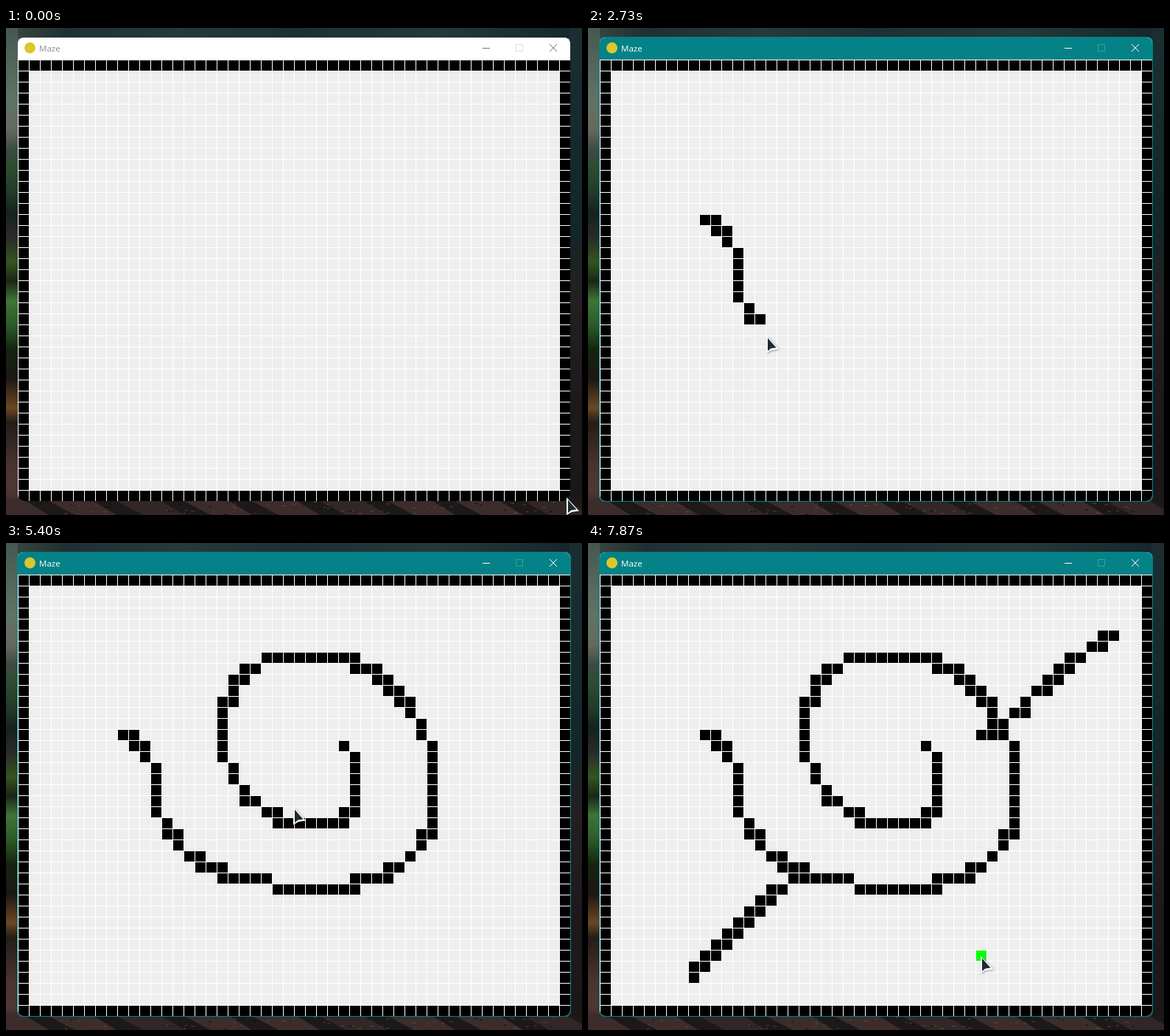
An HTML page with a canvas that plays this animation: 782 by 662 pixels, repeating every 8000 ms.

```html
<!DOCTYPE html>
<html lang="en">
<head>
<meta charset="utf-8">
<title>Maze</title>
<style>
  html, body { margin: 0; width: 100%; height: 100%; overflow: hidden; background: #18211f; }
  canvas { display: block; }
</style>
</head>
<body>
<canvas id="stage" width="782" height="662"></canvas>
<script>
const LOOP = 8000, FRAME = 200 / 3, PAINT_LAG = 30;
const COLS = 50, ROWS = 40, PITCH = 15, LEFT = 17, TOP = 44;
const FOCUS_TIME = 1000, GOAL_TIME = 7730, GOAL = [34, 34];
const ctx = document.getElementById('stage').getContext('2d');

// Piecewise linear lookup in a list of [x, y] knots.
function interpolate(knots, x) {
  let i = 1;
  while (i < knots.length - 1 && knots[i][0] < x) i++;
  const [x0, y0] = knots[i - 1], [x1, y1] = knots[i];
  return y0 + (y1 - y0) * (x - x0) / (x1 - x0);
}

// Walks the grid by compass moves such as "SE S4" and lists every cell passed.
function walk(col, row, moves) {
  const cells = [[col, row]];
  for (const [, heading, count] of moves.matchAll(/([NSEW]+)(\d*)/g)) {
    for (let n = +count || 1; n > 0; n--) {
      col += heading.includes('E') - heading.includes('W');
      row += heading.includes('S') - heading.includes('N');
      cells.push([col, row]);
    }
  }
  return cells;
}

// The mouse track holds plain waypoints and, while drawing, one point per cell.
const track = [];
const move = (t, x, y) => track.push({ t, x, y });
function draw(cells, knots) {
  cells.forEach(([col, row], i) => track.push({
    t: interpolate(knots, i), x: LEFT + 7 + col * PITCH, y: TOP + 7 + row * PITCH, cell: [col, row]
  }));
}

const spiral = walk(9, 14,
  'E S E S SE S4 SE S E S SE E S E2 S E4 SE E7 N E3 N E NE2 N E N8 ' +
  'NW N NW N W N W N W N W2 N W8 SW W S W S2 W S5 ' +
  'SE S SE S E SE E S E6 N E N5 NW');
const lowerLine = walk(17, 27, 'SW W ' + 'S W '.repeat(7) + 'S');
const upperLine = walk(34, 14, 'E N E NE E N NE E N E N E N E NE E N E');

const APPROACH = 800;
for (let i = 0; i <= 12; i++) {
  const u = i / 12, ease = u * u * (3 - 2 * u);
  move(40 + u * (APPROACH - 40), 762 - 587 * ease, 640 - 419 * ease);
}
move(870, 174, 224);
move(1200, 171, 297);
move(1500, 171, 297);
move(1733, 161, 265);
move(1870, 161, 265);
draw(spiral, [[0, 1900], [0.6, 2067], [13.4, 2733], [40.7, 3330], [52.5, 3600], [92, 4467], [104, 4733]]);
move(4830, 561, 240);
move(5070, 245, 437);
move(5330, 534, 260);
move(5400, 391, 361);
draw(lowerLine, [[0, 5520], [lowerLine.length - 1, 5930]]);
move(6200, 294, 413);
draw(upperLine, [[0, 6330], [upperLine.length - 1, 6690]]);
move(6867, 689, 186);
move(7070, 634, 337);
move(7330, 560, 470);
move(7530, 522, 560);
move(7860, 534, 563);

function pointerAt(t) {
  return {
    x: interpolate(track.map(p => [p.t, p.x]), Math.min(Math.max(t, track[0].t), 7860)),
    y: interpolate(track.map(p => [p.t, p.y]), Math.min(Math.max(t, track[0].t), 7860))
  };
}

function rect(x, y, w, h, color) {
  ctx.fillStyle = color;
  ctx.fillRect(x, y, w, h);
}

function polygon(points, color) {
  ctx.beginPath();
  points.forEach(([x, y]) => ctx.lineTo(x, y));
  ctx.closePath();
  ctx.fillStyle = color;
  ctx.fill();
}

function roundRect(x, y, w, h, radius) {
  ctx.beginPath();
  ctx.roundRect(x, y, w, h, radius);
}

function gradient(x0, y0, x1, y1, stops) {
  const fill = ctx.createLinearGradient(x0, y0, x1, y1);
  stops.forEach(([at, color]) => fill.addColorStop(at, color));
  return fill;
}

function drawForest() {
  rect(0, 0, 782, 662, gradient(0, 0, 0, 662, [
    [0, '#465850'], [.15, '#5f7466'], [.21, '#66685d'], [.25, '#3b4b44'], [.29, '#2d4c2e'],
    [.34, '#213a29'], [.38, '#16211f'], [.43, '#2b2b29'], [.48, '#35541f'], [.52, '#1b2618'],
    [.56, '#3e7635'], [.61, '#2c5a28'], [.66, '#16240f'], [.72, '#1c1715'], [.78, '#6b4822'],
    [.81, '#241d18'], [.9, '#4a3430'], [.95, '#4e3834'], [1, '#2b2124']
  ]));
  rect(16, 0, 766, 14, gradient(0, 0, 782, 0, [
    [0, '#3b4a46'], [.1, '#1f3033'], [.3, '#263a3b'], [.5, '#1d3033'], [.75, '#243939'], [1, '#14262a']
  ]));
  rect(765, 0, 17, 662, gradient(0, 0, 0, 662, [
    [0, '#1b2f32'], [.4, '#13262a'], [.55, '#241f20'], [.75, '#1e1a1b'], [1, '#1a1718']
  ]));
  rect(16, 642, 766, 20, '#1e1919');
  for (let x = -40; x < 700; x += 92) {
    polygon([[x, 640], [x + 62, 640], [x + 98, 662], [x + 42, 662]], x % 3 ? '#3d2c2c' : '#332627');
  }
  let seed = 7;
  const random = () => (seed = seed * 16807 % 2147483647) / 2147483647;
  for (let i = 0; i < 70; i++) {
    rect(80 + random() * 690, 644 + random() * 17, 2 + random() * 3, 1, ['#6a4a34', '#0e0d0e', '#51403a'][i % 3]);
  }
}

function drawWindow(active) {
  const ink = active ? '#ffffff' : '#777777';
  ctx.save();
  if (active) {
    roundRect(15, 12, 752, 632, 8);
    ctx.fillStyle = '#058287';
    ctx.fill();
  }
  roundRect(16, 13, 750, 630, 8);
  ctx.clip();
  rect(16, 13, 750, 630, '#ffffff');
  if (active) rect(16, 13, 750, 30, '#058287');

  for (let row = 0; row < ROWS; row++) {
    for (let col = 0; col < COLS; col++) {
      const wall = row === 0 || col === 0 || row === ROWS - 1 || col === COLS - 1;
      drawCell([col, row], wall ? '#000000' : '#eeeeee');
    }
  }
  ctx.restore();

  ctx.beginPath();
  ctx.arc(32.5, 27, 7.5, 0, 2 * Math.PI);
  ctx.fillStyle = '#dcc72c';
  ctx.fill();

  ctx.font = '11.5px "Open Sans", sans-serif';
  ctx.fillStyle = active ? '#ffffff' : '#8c8c8c';
  ctx.fillText('Maze', 45, 32);

  rect(647, 27, 10, 1, ink);
  ctx.lineWidth = 1;
  ctx.strokeStyle = active ? '#3d9ea2' : '#dfdfdf';
  ctx.strokeRect(692.5, 22.5, 9, 9);
  ctx.beginPath();
  ctx.moveTo(738, 22);
  ctx.lineTo(748, 32);
  ctx.moveTo(748, 22);
  ctx.lineTo(738, 32);
  ctx.strokeStyle = ink;
  ctx.stroke();
}

function drawCell([col, row], color) {
  rect(LEFT + col * PITCH, TOP + row * PITCH, PITCH - 1, PITCH - 1, color);
}

function drawPointer({ x, y }) {
  ctx.save();
  ctx.translate(Math.round(x), Math.round(y));
  ctx.shadowColor = 'rgba(0, 0, 0, .35)';
  ctx.shadowBlur = 3;
  ctx.shadowOffsetX = ctx.shadowOffsetY = 1;
  polygon([[-1, -2], [-1, 22], [6, 18], [16, 16.5]], '#ffffff');
  ctx.shadowColor = 'transparent';
  polygon([[1, 1.5], [1, 19], [5.5, 15.5], [12.5, 14.5]], '#1f2b33');
  ctx.restore();
}

function render(now) {
  const t = Math.floor((now % LOOP + 3.4) / FRAME) * FRAME % LOOP;
  drawForest();
  drawWindow(t >= FOCUS_TIME);
  for (const point of track) {
    if (point.cell && t >= point.t + PAINT_LAG) drawCell(point.cell, '#000000');
  }
  if (t >= GOAL_TIME) drawCell(GOAL, '#00ff00');
  drawPointer(pointerAt(t));
}

const start = performance.now();
(function tick() {
  render(performance.now() - start);
  requestAnimationFrame(tick);
})();
</script>
</body>
</html>
```
